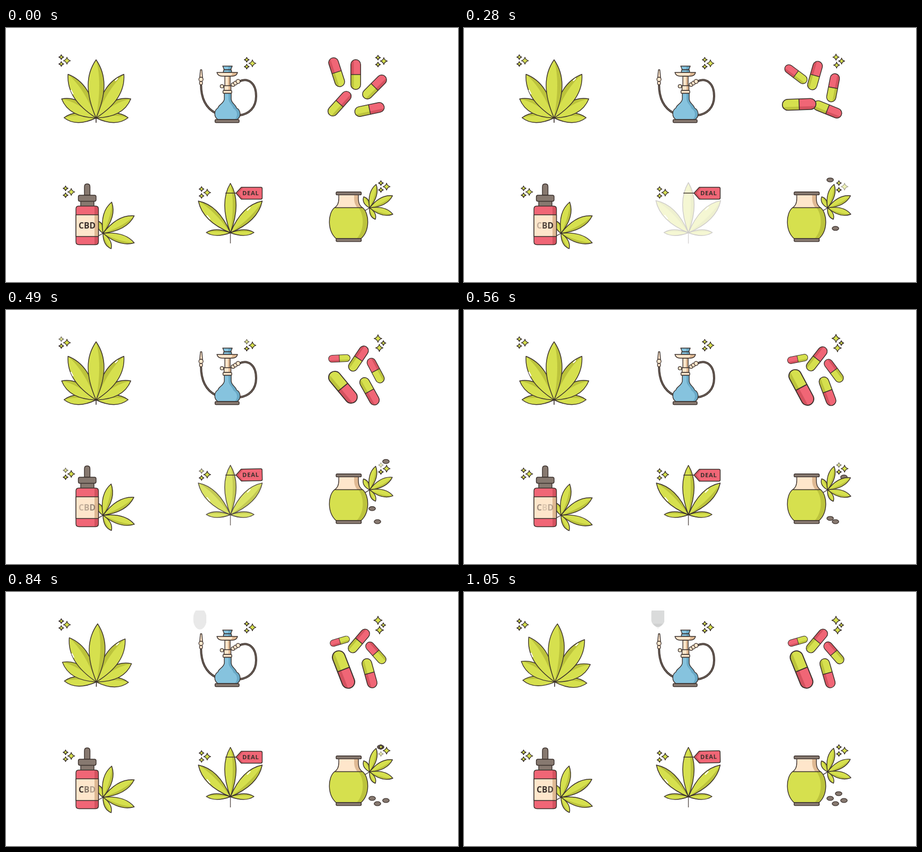
These frames come from a looping animation (853 by 480 pixels, 1.12 s). An HTML page with a canvas:

```html
<!DOCTYPE html>
<html lang="en">
<head>
<meta charset="utf-8">
<title>Herbal icons</title>
<style>
html, body { margin: 0; width: 100%; height: 100%; overflow: hidden; background: #fff; }
canvas { display: block; width: 853px; height: 480px; }
</style>
</head>
<body>
<canvas id="stage" width="853" height="480"></canvas>
<script>
const ctx = document.getElementById('stage').getContext('2d');
const LOOP = 1120, STEP = 70, TAU = Math.PI * 2;
const C = {
  line: '#3a302c', green: '#d6e04e', greenDark: '#bcc33c', red: '#f06676', redDark: '#d4525f',
  blue: '#86c3de', blueDark: '#6aa9c6', cream: '#fee6cb', creamDark: '#dfb993', brown: '#877970'
};
const FONT = '"Open Sans", "Noto Sans", sans-serif';

const rad = d => d * Math.PI / 180;
const mix = (a, b, p) => a + (b - a) * p;
const smooth = u => { u = Math.min(1, Math.max(0, u)); return u * u * (3 - 2 * u); };
// Falls linearly to low at the centre, back to 1 at either side
const dip = (t, centre, half, low) => low + (1 - low) * Math.min(1, Math.abs(t - centre) / half);

function turned(x, y, deg, draw) {
  ctx.save();
  ctx.translate(x, y);
  ctx.rotate(rad(deg));
  ctx.translate(-x, -y);
  draw();
  ctx.restore();
}

function stroke(path, width = 1.4, color = C.line) {
  ctx.lineWidth = width;
  ctx.strokeStyle = color;
  ctx.stroke(path);
}

function shape(d, fill, shade, shadeD) {
  const path = new Path2D(d);
  ctx.fillStyle = fill;
  ctx.fill(path);
  if (shade) {
    ctx.save();
    ctx.clip(path);
    ctx.fillStyle = shade;
    ctx.fill(new Path2D(shadeD));
    ctx.restore();
  }
  stroke(path);
}

function line(d, width, color) { stroke(new Path2D(d), width, color); }

function box(x, y, w, h, r, fill) {
  const path = new Path2D();
  path.roundRect(x, y, w, h, r);
  ctx.fillStyle = fill;
  ctx.fill(path);
  stroke(path);
}

function oval(x, y, rx, ry, fill) {
  const path = new Path2D();
  path.ellipse(x, y, rx, ry, 0, 0, TAU);
  ctx.fillStyle = fill;
  ctx.fill(path);
  stroke(path, 1.3);
}

function leaflet(bx, by, tx, ty, w, side = 1) {
  const len = Math.hypot(tx - bx, ty - by), h = w * 4 / 3;
  const path = new Path2D(`M0 0C${len * .42} ${h} ${len * .74} ${h} ${len} 0C${len * .74} ${-h} ${len * .42} ${-h} 0 0Z`);
  const a = h * side, b = a * .4;
  const shade = new Path2D(`M0 0C${len * .42} ${a} ${len * .74} ${a} ${len} 0C${len * .74} ${b} ${len * .42} ${b} 0 0Z`);
  ctx.save();
  ctx.translate(bx, by);
  ctx.rotate(Math.atan2(ty - by, tx - bx));
  ctx.fillStyle = C.green;
  ctx.fill(path);
  ctx.fillStyle = C.greenDark;
  ctx.fill(shade);
  stroke(path);
  ctx.restore();
}

function star(x, y, r, alpha = 1) {
  const k = r * .2;
  ctx.save();
  ctx.globalAlpha = alpha;
  ctx.translate(x, y);
  const path = new Path2D(`M0 ${-r}Q${k} ${-k} ${r} 0Q${k} ${k} 0 ${r}Q${-k} ${k} ${-r} 0Q${-k} ${-k} 0 ${-r}Z`);
  ctx.fillStyle = C.green;
  ctx.fill(path);
  stroke(path, 1.3);
  ctx.restore();
}

function sparkles(x, y, t, centres = [420, 140, 700], half = 150) {
  const [top, big, low] = centres.map(c => dip(t, c, half, .28));
  star(x, y, 4.6, top);
  star(x + 10.7, y + 6.8, 6.6, big);
  star(x, y + 13, 4.6, low);
}

function bigLeaf(t) {
  turned(170, 200, 2.6 * smooth((t - 720) / 250), () => {
    const x = 170, y = 170;
    leaflet(x, y, 109.5, 169.5, 9.2);
    leaflet(x, y, 230.5, 169.5, 9.2, -1);
    leaflet(x, y, 105, 134, 12);
    leaflet(x, y, 235.5, 134, 12, -1);
    leaflet(x, y, 117, 87.5, 14);
    leaflet(x, y, 222.5, 87.5, 14, -1);
    leaflet(x, y, x, 60, 15);
    line('M170 168V179', 1.6);
    line('M122.5 117L126.5 125M206 100L211 95', 2, '#fff');
  });
}

function smoke(t) {
  if (t < 630) return;
  const rise = (t - 700) / 350;
  ctx.save();
  ctx.beginPath();
  ctx.rect(353.5, 35, 24.5, 50);
  ctx.clip();
  const y = 54 - 8 * rise, flare = Math.max(0, rise) * 6;
  ctx.fillStyle = `rgba(60,65,65,${.065 + .125 * rise})`;
  ctx.beginPath();
  ctx.ellipse(366, y, 12 + flare / 3, 20, 0, 0, TAU);
  ctx.fill();
  if (rise > .7) {
    ctx.fillStyle = 'rgba(60,65,65,.07)';
    ctx.fill(new Path2D('M357 60L366 70L375 60Z'));
  }
  ctx.restore();
}

function hookah(t) {
  for (const d of ['M440 101C456 93 472 103 472 129C472 150 459 163 440 165', 'M368 106C368 134 378 152 396 161']) {
    line(d, 4);
    line(d, 1.5, '#74665e');
  }
  shape('M367 79H369.5L371 94H365.5Z', C.cream);
  oval(368, 104, 2.8, 3.4, C.cream);
  oval(368, 97, 4, 4, C.cream);

  shape('M409 72H427L424 79H412Z', C.blue, C.blueDark, 'M420 70H430V80H419Z');
  shape('M411 79H425L426 84H410Z', C.blue, C.blueDark, 'M420 78H428V86H420Z');
  shape('M413 91H423V111H413Z', C.cream, C.creamDark, 'M419 90H425V112H419Z');
  shape('M398 84H437Q435 91 427 91H408Q400 91 398 84Z', C.cream, C.creamDark, 'M428 83H440V92H421Q427 90 428 83Z');
  oval(428.5, 107, 3.5, 3.3, C.cream);
  oval(433, 104, 3.6, 3.6, C.cream);
  oval(438, 101, 3.8, 3.8, C.cream);
  oval(407.5, 110, 3.2, 3.2, C.cream);
  shape('M411.5 109H424.5V118H411.5Z', C.cream, C.creamDark, 'M420 108H426V119H420Z');
  box(409.5, 118, 16.5, 5.5, 2, C.cream);
  shape('M412 123.5H425V134C425 142 434 145 435 151C444 156 444 168 436 173H400C392 168 392 156 400 151C401 145 412 142 412 134Z',
    C.blue, C.blueDark, 'M420 122H450V175H430C439 166 437 157 429 152C428 146 420 142 420 134Z');
  box(394.5, 173, 45.5, 5.8, 2, C.brown);
  smoke(t);
}

function pill(x, y, size, deg, side) {
  const w = 18.5 * size, len = 56.5 * size;
  const path = new Path2D();
  path.roundRect(-w / 2, -len / 2, w, len, w / 2);
  ctx.save();
  ctx.translate(x, y);
  ctx.rotate(rad(deg));
  ctx.save();
  ctx.clip(path);
  const edge = side < 0 ? -w / 2 : w * .2;
  [[C.red, C.redDark, -len / 2], [C.green, C.greenDark, 0]].forEach(([main, dark, top]) => {
    ctx.fillStyle = main;
    ctx.fillRect(-w / 2, top, w, len / 2);
    ctx.fillStyle = dark;
    ctx.fillRect(edge, top, w * .3, len / 2);
  });
  ctx.restore();
  const lw = 1.45 * size;
  stroke(path, lw);
  line(`M${-w / 2} 0H${w / 2}`, lw);
  ctx.restore();
}

// x, y, angle at the start; x, y, angle, size at the end; shaded side
const PILLS = [
  [624, 83.5, -18, 630, 93, -106, .67, -1],
  [660, 88, 0, 666, 92.5, 40, .94, -1],
  [695.5, 111.5, 45, 698, 115, -41, .88, 1],
  [686, 154, 78, 686, 153.5, 164, 1, 1],
  [629.5, 143, 42, 637, 146.5, 158, 1.31, 1]
];

function pills(t) {
  const p = smooth(t / 650), sway = .015 * (1 - dip(t, 910, 140, 0));
  for (const [x, y, a, x2, y2, a2, size, side] of PILLS)
    pill(mix(x, x2, p), mix(y, y2, p), mix(1, size, p), mix(a, a2, p + sway), side);
  star(702, mix(56, 53.5, p), mix(4.6, 7.8, p));
  star(mix(713, 712, p), 62.5, mix(6.6, 4.4, p));
  star(mix(702, 705, p), mix(69, 72, p), mix(4.6, 7.4, p));
}

function bottle(t, wave) {
  turned(183, 388, 1.5 * wave, () => {
    line('M174 393L183 388');
    leaflet(183, 388, 174, 365, 5);
    leaflet(183, 388, 199.5, 329, 8.5);
    leaflet(183, 388, 242, 355, 9);
    leaflet(183, 388, 242, 406, 8);
    leaflet(183, 388, 198.5, 417, 5.5);
  });
  shape('M148 316V300Q148 294.5 153.3 294.5Q158.5 294.5 158.5 300V316Z', C.brown);
  box(141, 327, 25, 10, 1, C.brown);
  box(136.5, 316, 33.5, 11.5, 3, C.brown);
  shape('M137 336.5H169Q174.5 336.5 174.5 342V404Q174.5 409.5 169 409.5H138Q132 409.5 132 404V342Q132 336.5 137 336.5Z',
    C.red, C.redDark, 'M167 335H176V411H167Z');
  shape('M132 353H174.5V394H132Z', C.cream, C.creamDark, 'M167 352H176V396H167Z');

  ctx.font = `bold 15.6px ${FONT}`;
  ctx.fillStyle = C.line;
  let x = 137;
  [['C', 390, 400], ['B', 610, 380], ['D', 690, 420]].forEach(([ch, centre, half]) => {
    ctx.globalAlpha = dip(t, centre, half, .04);
    ctx.fillText(ch, x, 379);
    x += ctx.measureText(ch).width;
  });
  ctx.globalAlpha = 1;
}

function deal(t, wave) {
  const alpha = dip(t, 265, 265, .2), x = 423.5, y = 387;
  ctx.save();
  ctx.translate(x, y);
  ctx.scale(1 + .02 * (1 - alpha), 1 + .02 * (1 - alpha));
  ctx.translate(-x, -y);
  line('M423.5 386V407', 1.4, '#5c534f');
  leaflet(x, y, 363, 327, 11);
  leaflet(x, y, 483.5, 327, 11);
  leaflet(x, y, 378, 386.5, 5.5);
  leaflet(x, y, 468, 386.5, 5.5, -1);
  leaflet(x, y, x, 293.5, 11);
  line('M379 354L385 361M455 345L461 339', 2, '#fff');
  ctx.restore();
  ctx.fillStyle = `rgba(255,255,255,${1 - alpha})`;
  ctx.fillRect(355, 284, 136, 128);

  line('M414 312H437', 1.4);
  turned(434, 312, 1.8 * wave, () => {
    shape('M434 312L444 301H481Q483.5 301 483.5 303.5V321Q483.5 323.5 481 323.5H444Z',
      C.red, C.redDark, 'M434 312L444 301H448L439 312L448 324H444Z');
    ctx.font = `bold 11.3px ${FONT}`;
    ctx.letterSpacing = '0.7px';
    ctx.fillStyle = C.line;
    ctx.fillText('DEAL', 446, 316);
    ctx.letterSpacing = '0px';
  });
}

// x, resting y, start time
const SEEDS = [[701, 400, 57], [691, 390, 275], [717, 394, 487], [707, 381, 821]];
const FALL = .42;

function seed(x, rest, start, t) {
  if (t < start) return;
  let y = 285 + (t - start) * FALL;
  if (y > rest) y = rest + 4 * Math.sin(Math.PI * Math.min(1, (y - rest) / FALL / 60));
  oval(x, y, 6.2, 3.8, C.brown);
}

function pot(t, wave) {
  for (const s of SEEDS) seed(...s, t);
  turned(686, 340, 1.6 * wave, () => {
    line('M676 346L686 340');
    leaflet(686, 340, 675, 319, 4.8);
    leaflet(686, 340, 698.5, 295.5, 6.5);
    leaflet(686, 340, 729.5, 317, 6.8);
    leaflet(686, 340, 730, 352, 6.5);
    leaflet(686, 340, 697, 361.5, 4.5);
  });
  shape('M628 315H665V322C665 332 668 336 673 340H620C625 336 628 332 628 322Z',
    C.cream, C.creamDark, 'M657 314H675V341H664C659 334 657 330 657 322Z');
  shape('M620 339.5H673C686 350 687 383 670 398H623C606 383 607 350 620 339.5Z',
    C.green, C.greenDark, 'M664 338H690V400H660C677 383 677 353 664 338Z');
  box(623, 309.8, 47.5, 5.6, 2, C.brown);
  box(623, 397.8, 47.5, 5.8, 2, C.brown);
}

function frame() {
  const t = Math.floor(performance.now() % LOOP / STEP) * STEP;
  const wave = Math.sin(TAU * t / 560);
  ctx.lineJoin = 'round';
  ctx.fillStyle = '#fff';
  ctx.fillRect(0, 0, 853, 480);

  bigLeaf(t);
  sparkles(104.3, 55, t);
  hookah(t);
  sparkles(454.3, 60, t);
  pills(t);
  bottle(t, wave);
  sparkles(112.4, 303, t);
  deal(t, wave);
  sparkles(369, 304.3, t);
  pot(t, wave);
  sparkles(707.5, 293, t, [470, 245, 800], 220);
  requestAnimationFrame(frame);
}
frame();
</script>
</body>
</html>
```
